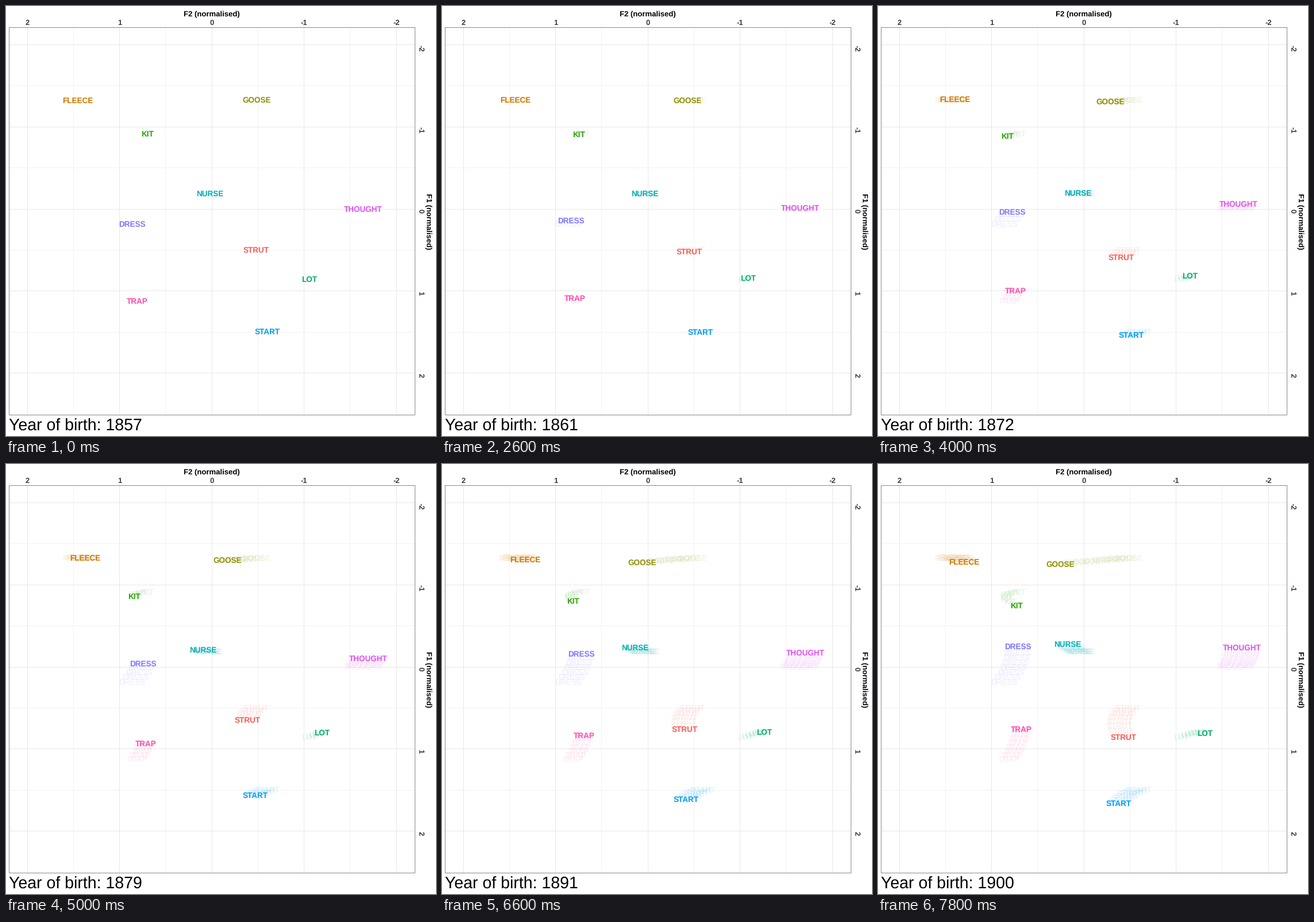
Write a matplotlib script that moves like this. It is 748 px wide and 748 px high and loops after 8 s.

```python
import matplotlib.pyplot as plt
import numpy as np
from matplotlib.animation import FuncAnimation
from matplotlib.patches import Rectangle

SIZE, DPI = 748, 100
FRAMES, STEP_MS = 40, 200
HOLD, MID, LAST = 10, 25, 39   # drift begins, is halfway, ends
TRAIL = 4                      # frames between two trail marks
FIRST_YEAR, YEARS_PER_FRAME = 1857, 131 / 88

# Start, middle and end of each drift, in order of hue
WORDS = {
    "STRUT": [(435, 424), (420.5, 445.5), (427, 475.5)],
    "FLEECE": [(125, 164.5), (138, 163), (150, 170.5)],
    "GOOSE": [(436, 163.5), (385, 167.5), (317, 174)],
    "KIT": [(246, 222), (222.5, 230), (241, 246)],
    "LOT": [(528, 475.5), (550, 467), (568.5, 468)],
    "NURSE": [(355, 326.5), (343, 323.5), (330, 313.5)],
    "START": [(454.5, 565.7), (434, 576), (419, 590)],
    "DRESS": [(219, 379), (238, 347), (243, 317)],
    "THOUGHT": [(621, 353.5), (630, 338.5), (633.5, 319)],
    "TRAP": [(228, 513.7), (243, 486.5), (249.5, 461.3)],
}

plt.rcParams["font.family"] = "Liberation Sans"
plt.rcParams["text.hinting"] = "none"


def px(n):
    """Pixels to points."""
    return n * 72 / DPI


def hue_color(index, light=65, chroma=100, gamma=1.3):
    """Evenly spaced hues of equal lightness (polar LUV), slightly deepened."""
    h = np.radians(15 + 360 * index / len(WORDS))
    u = chroma * np.cos(h) / (13 * light) + 0.1978
    v = chroma * np.sin(h) / (13 * light) + 0.4683
    y = ((light + 16) / 116) ** 3
    x, z = 9 * y * u / (4 * v), y * (12 - 3 * u - 20 * v) / (4 * v)
    linear = np.array([3.2406 * x - 1.5372 * y - 0.4986 * z,
                       -0.9689 * x + 1.8758 * y + 0.0415 * z,
                       0.0557 * x - 0.2040 * y + 1.0570 * z]).clip(0, 1)
    rgb = np.where(linear > 0.0031, 1.055 * linear ** (1 / 2.4) - 0.055,
                   12.92 * linear)
    return tuple(rgb.clip(0, 1) ** gamma)


fig = plt.figure(figsize=(SIZE / DPI, SIZE / DPI), dpi=DPI, facecolor="white")
ax = fig.add_axes((0, 0, 1, 1))
ax.set(xlim=(0, SIZE), ylim=(SIZE, 0))
ax.axis("off")


def label(x, y, text, size, color="black", **kw):
    style = dict(ha="center", va="baseline", weight="bold")
    style.update(kw)
    return ax.text(x, y, text, size=px(size), color=color, **style)


def draw_grid():
    left, top, right, bottom = 5.5, 37.5, 711.5, 711.5
    for half in range(9):
        major = half % 2 == 0
        look = dict(color="#e8e8e8" if major else "#f2f2f2", lw=px(1),
                    snap=False, zorder=1 if major else 0)
        x, y = 37 + 80.25 * half, 67.5 + 71.375 * half
        col, row = int(x) + 0.5, int(y) + 0.5
        ax.plot((col, col), (top, bottom), **look)
        ax.plot((left, right), (row, row), **look)
        if major:
            value = half // 2 - 2
            label(x, 33, str(-value), 13, "#3c3c3c")
            label(720.5, y + (6 if value < 0 else 3.7), str(value), 13,
                  "#3c3c3c", va="center", rotation=270)
    ax.add_patch(Rectangle((left, top), right - left, bottom - top, fill=False,
                           ec="#8a8a8a", lw=px(1), snap=False, zorder=2))
    label(358.3, 18, "F2 (normalised)", 13.1)
    label(733.6, 375, "F1 (normalised)", 13.1, va="center", rotation=270)


# One parabola per word through its three points
PATHS = {word: np.polyfit((HOLD, MID, LAST), points, 2)
         for word, points in WORDS.items()}


def place(word, frame):
    t = max(frame, HOLD)
    x, y = np.array([t * t, t, 1]) @ PATHS[word]
    return x, y + 4.8


draw_grid()
marks, movers = [], {}
for i, word in enumerate(WORDS):
    color = hue_color(i)
    for start in range(HOLD, FRAMES, TRAIL):
        mark = label(*place(word, start), word, 13.5, color,
                     alpha=0.1, zorder=3)
        marks.append((start, mark))
    movers[word] = label(*place(word, 0), word, 13.5, color, zorder=4)
year_text = label(5.5, 738, "", 28.5, ha="left", weight="normal")


def update(frame):
    for start, mark in marks:
        mark.set_visible(frame > start)
    for word, mover in movers.items():
        mover.set_position(place(word, frame))
    year = FIRST_YEAR + YEARS_PER_FRAME * max(frame - HOLD, 0)
    year_text.set_text(f"Year of birth: {round(year)}")
    return [year_text, *movers.values()]


anim = FuncAnimation(fig, update, frames=FRAMES, interval=STEP_MS,
                     repeat=True, repeat_delay=0, blit=False)
plt.show()
```
